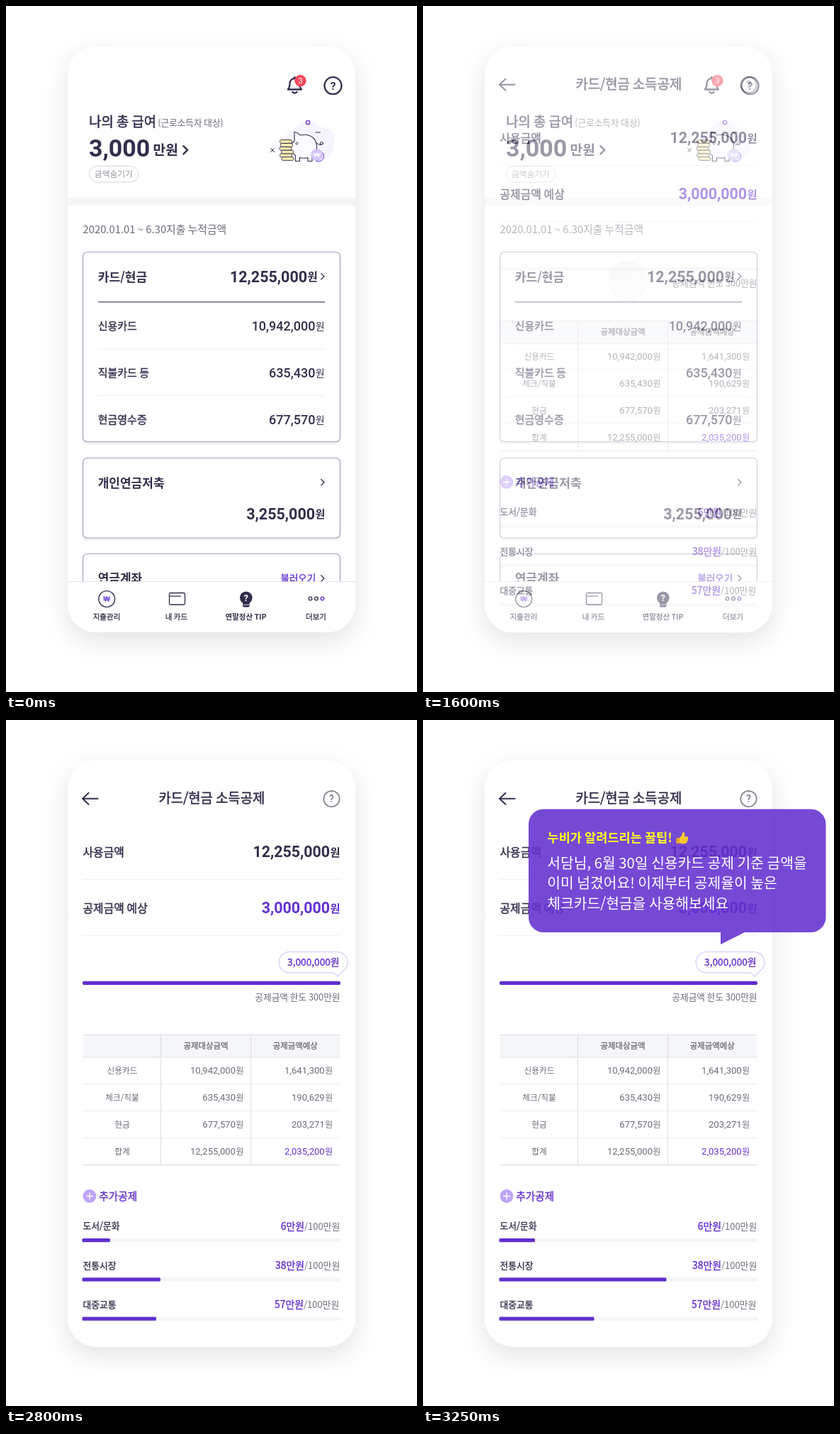
These frames come from a looping animation (580x966 px, 8700 ms). An HTML page:

```html
<!DOCTYPE html>
<html lang="ko">
<head>
<meta charset="utf-8">
<style>
html, body { margin: 0; width: 100%; height: 100%; overflow: hidden; background: #fff; }
svg { display: block; }
text { font-family: "Noto Sans CJK KR", "Noto Sans CJK", sans-serif; white-space: pre; word-spacing: -0.055em; }
.num { font-family: Roboto, "Noto Sans CJK KR", sans-serif; }
.line { fill: none; stroke-linecap: round; stroke-linejoin: round; }
</style>
</head>
<body>
<svg id="stage" width="580" height="966" viewBox="0 0 580 966"></svg>
<script>
const INK = '#332d4b', GRAY = '#6d6a78', PURPLE = '#6230cf';
const LOOP = 8700;

// y is the optical centre of the line; Hangul has no medium cut, so a hairline stroke thickens it
const text = (str, x, y, size, weight = 400, fill = INK, anchor = 'start', cls = '') => {
  const medium = weight === 500 && !cls ? `stroke="${fill}" stroke-width="${size * 0.026}"` : '';
  return `<text x="${x}" y="${y + size * 0.365}" font-size="${size}" font-weight="${weight}" fill="${fill}" text-anchor="${anchor}" class="${cls}" ${medium}>${str}</text>`;
};
const won = (num, right, y, size, wonSize, weight, wonWeight, fill = INK) =>
  text(num, right - wonSize * 0.92 - 0.4, y, size, weight, fill, 'end', 'num') +
  text('원', right, y + 0.5, wonSize, wonWeight, fill, 'end');
const line = (d, color = INK, width = 1.5, fill = 'none') =>
  `<path d="${d}" class="line" style="fill:${fill}" stroke="${color}" stroke-width="${width}"/>`;
const rect = (x, y, w, h, r, fill, extra = '') =>
  `<rect x="${x}" y="${y}" width="${w}" height="${h}" rx="${r}" fill="${fill}" ${extra}/>`;
const circle = (x, y, r, fill, stroke = 'none', width = 1.5, extra = '') =>
  `<circle cx="${x}" cy="${y}" r="${r}" fill="${fill}" stroke="${stroke}" stroke-width="${width}" ${extra}/>`;
const hr = (x1, x2, y, color = '#eeeef1', width = 1) => line(`M${x1} ${y}H${x2}`, color, width);
const chevron = (x, y, r, width) => line(`M${x} ${y - r}l${r} ${r}l${-r} ${r}`, INK, width);
const card = (y, h) => rect(108.6, y, 362.8, h, 6, '#fff', 'stroke="#a5a2bb" stroke-width="1.1" filter="url(#cardShadow)"');

const defs = `<defs>
  <filter id="phoneShadow" x="-20%" y="-20%" width="140%" height="140%"><feDropShadow dx="0" dy="12" stdDeviation="17" flood-opacity=".11"/></filter>
  <filter id="cardShadow" x="-5%" y="-10%" width="110%" height="125%"><feDropShadow dx="0" dy="2" stdDeviation="1.5" flood-color="#332d4b" flood-opacity=".14"/></filter>
  <filter id="touchShadow" x="-30%" y="-30%" width="160%" height="160%"><feDropShadow dx="0" dy="1.5" stdDeviation="1.8" flood-opacity=".12"/></filter>
  <linearGradient id="touchFill" x2=".4" y2="1"><stop stop-color="#f1f1f3"/><stop offset="1" stop-color="#fcfcfc"/></linearGradient>
</defs>`;

const coin = (x, y) => rect(x, y, 17, 4.8, 2, '#fbeeb4', `stroke="${INK}" stroke-width=".9"`);
const piggy =
  `<path d="M394 195C390 180 402 178 410 169C420 158 434 160 440 168C447 174 464 168 463 188C462 199 464 205 456 212C446 221 410 216 402 211C397 207 396 201 394 195Z" fill="#f6f4fe"/>` +
  circle(426, 164, 2.7, '#fff', PURPLE, 1.3) +
  hr(437, 443.5, 178, INK, 1.1) +
  line('M373.3 200.3l5.4 5.4m0-5.4l-5.4 5.4', INK, 1) +
  line('M407 190V177.5Q412 178 415 182Q427 179.5 434 186Q439 191 438.5 200Q437 207 432 211V218.5H426V213.5Q420 215 414.5 213.5V218.5H408.5V210.5Q404 208 403 203L400 202V194L404 193Z', INK, 1.1, '#fbfaff') +
  line('M438.5 193Q444 198 447 193.5Q447.5 190 444 192Q441 197 448 194', INK, 1) +
  circle(410.5, 193.5, 1.5, '#fff', INK, 1) +
  coin(386.5, 188.5) + coin(387.5, 193.5) + coin(386, 198.4) + coin(388.5, 203.2) +
  coin(386.5, 208) + coin(389, 212.6) +
  circle(441, 211.5, 7.6, 'none', PURPLE, 1) + circle(438.8, 209.7, 8.6, '#d3c4f7') +
  line('M434.5 207l2 5.5l2.3-5.5l2.3 5.5l2-5.5M433.5 209.3h10.6', '#fff', 1.1);

const tab = (label, x, weight = 500) => text(label, x, 860, 10.5, weight, INK, 'middle');
const tabBar =
  `<path d="M87 810.5H493V842a40 40 0 0 1-40 40H127a40 40 0 0 1-40-40Z" fill="#fff"/>` +
  hr(87.5, 492.5, 810.5, '#e2e2e6') +
  circle(142.2, 835, 11.4, '#fff', INK, 1.4) +
  line('M138.3 831l2 7.5l1.9-7.5l1.9 7.5l2-7.5M137.3 833.7h9.8M137.3 836.1h9.8', PURPLE, 1) +
  rect(230.5, 826.5, 22, 16.5, 1.8, '#fff', `stroke="${INK}" stroke-width="1.3"`) + hr(231, 246.5, 831.2, INK, 1.2) +
  circle(338.8, 833.2, 8.8, INK) + rect(334, 838, 9.6, 8.5, 2.6, INK) + hr(334.5, 343, 843.2, '#fff', 0.8) +
  text('?', 338.8, 833, 13, 700, '#fff', 'middle', 'num') +
  circle(429.5, 834.5, 2.3, '#fff', INK, 1.3) + circle(438, 834.5, 2.3, '#fff', INK, 1.3) + circle(446.5, 834.5, 2.3, '#fff', PURPLE, 1.3) +
  tab('지출관리', 142) + tab('내 카드', 240.5) + tab('연말정산 TIP', 338.5, 700) + tab('더보기', 437.5);

const spendRows = [['신용카드', '10,942,000', 450.5], ['직불카드 등', '635,430', 516.5], ['현금영수증', '677,570', 582.5]];
const home =
  rect(87, 57, 406, 825, 40, '#fff', 'filter="url(#phoneShadow)"') +
  line('M397.8 117.5H417C414.3 115 414.6 112 414.3 109C414 104.5 411 102 407.4 102C403.8 102 400.8 104.5 400.5 109C400.2 112 400.5 115 397.8 117.5ZM404.3 121Q407.4 124.5 410.5 121M407.4 101.5V100', INK, 2.3) +
  circle(415.5, 105.2, 8.2, '#f2495c') + text('3', 415.5, 105.2, 11.5, 400, '#fff', 'middle', 'num') +
  circle(461.5, 112.2, 12, '#fff', INK, 2.3) + text('?', 461.5, 112.2, 15.5, 700, INK, 'middle', 'num') +
  text('나의 총 급여', 117.3, 163, 18.8, 500) + text('(근로소득자 대상)', 214.3, 164.5, 12.6, 400, GRAY) +
  text('3,000', 117, 199.7, 34, 700, INK, 'start', 'num') + text('만원', 207.5, 203, 19.2, 700) + chevron(250.5, 202.8, 5.6, 2.4) +
  rect(117.5, 225.5, 69.5, 22.5, 11.25, '#fff', 'stroke="#d4d4da"') + text('금액숨기기', 152, 236.5, 11.7, 400, '#94929e', 'middle') +
  piggy +
  rect(87, 270, 406, 11, 0, '#f4f5f6') +
  text('2020.01.01 ~ 6.30지출 누적금액', 108.5, 314.5, 14.8, 400, GRAY) +
  card(346.5, 267) + text('카드/현금', 129.7, 381.5, 17.1, 700) +
  won('12,255,000', 439.8, 381, 21.5, 15.5, 700, 700) + chevron(444.7, 380.7, 4.3, 1.3) +
  hr(130.5, 449.5, 416.8, '#6a6685', 1.4) + hr(130.5, 449.5, 483) + hr(130.5, 449.5, 548.5) +
  spendRows.map(([label, sum, y]) => text(label, 129.7, y, 15, 500) + won(sum, 449.7, y, 18, 14, 500, 400)).join('') +
  card(636.5, 112.5) + text('개인연금저축', 129.7, 671.5, 17, 700) + chevron(444.7, 670.8, 4.3, 1.3) +
  won('3,255,000', 450.3, 715.5, 21.5, 15, 700, 700) +
  card(771.5, 70) + text('연금계좌', 129.7, 806, 17, 700) + text('불러오기', 387.5, 806, 13.5, 500, PURPLE) + chevron(444.7, 806, 4.3, 1.3) +
  tabBar;

const tableRows = [['신용카드', '10,942,000', '1,641,300'], ['체크/직불', '635,430', '190,629'], ['현금', '677,570', '203,271'], ['합계', '12,255,000', '2,035,200']];
const table =
  rect(108.5, 443.5, 363, 31.5, 0, '#f5f6f9') +
  hr(109, 471, 443.5, '#dddde2') + hr(109, 471, 475, '#dddde2') +
  [512.5, 550.5, 588.5].map(y => hr(109, 471, y)).join('') + hr(109, 471, 626.5, '#d8d8de', 1.2) +
  line('M218.5 444V626M345.5 444V626', '#dddde2', 1) +
  text('공제대상금액', 282, 459, 11.4, 500, GRAY, 'middle') + text('공제금액예상', 408.3, 459, 11.4, 500, GRAY, 'middle') +
  tableRows.map(([label, base, cut], i) => {
    const y = 493.5 + i * 38;
    return text(label, 164, y, 11.7, 400, GRAY, 'middle') + won(base, 335.3, y, 13.1, 11.8, 400, 400, GRAY) +
      won(cut, 461, y, 13.1, 11.8, 400, 400, i === 3 ? PURPLE : GRAY);
  }).join('');

// label, amount, right edge, text centre, bar width, end time
const extras = [['도서/문화', '6만원', 471.3, 712.8, 50.5, 2900], ['전통시장', '38만원', 471.3, 768, 236, 3200], ['대중교통', '57만원', 470.3, 823.2, 134, 2900]];
const detail =
  rect(88, 57, 404.5, 826, 40, '#fff') +
  line('M108 110.8H129.5M116.5 102.8L108 110.8L116.5 118.8', INK, 2) +
  text('카드/현금 소득공제', 290.3, 110.5, 18.8, 500, INK, 'middle') +
  circle(459.5, 111, 11.2, '#fff', '#86838f', 1.7) + text('?', 459.5, 111, 14, 500, '#77748a', 'middle', 'num') +
  text('사용금액', 108.5, 186, 15.9, 500) + won('12,255,000', 471.6, 185.6, 21.4, 15.3, 700, 700) + hr(109, 471, 224.8) +
  text('공제금액 예상', 108.5, 265, 15.9, 500) + won('3,000,000', 471.6, 264.6, 21.4, 15.3, 700, 700, PURPLE) + hr(107, 470, 303.8) +
  rect(108, 367.7, 364, 5.3, 1.5, '#f4f5f8') + rect(108, 367.7, 0, 5.3, 1.5, PURPLE, 'id="mainBar"') +
  text('공제금액 한도 300만원', 471.5, 390.5, 12.7, 400, GRAY, 'end') +
  table +
  circle(118, 670.5, 9.4, '#bda4f8') + line('M113.5 670.5h9M118 666v9', '#fff', 1.3) + text('추가공제', 131.3, 671, 14.7, 500, PURPLE) +
  extras.map(([label, sum, right, y], i) =>
    text(label, 108.5, y, 12.8, 500) +
    text('/100만원', right, y, 12.9, 400, GRAY, 'end') + text(sum, right - 50.2, y, 13.9, 500, PURPLE, 'end') +
    rect(108, y + 17.2, 364, 5.3, 1.5, '#f5f5f7') + rect(107.5, y + 17.2, 0, 5.3, 1.5, PURPLE, `id="bar${i}"`)).join('') +
  `<g id="tooltip">` +
  line('M400 326.5H467.2A14.7 14.7 0 0 1 475 353.8L468 361L462.5 356H400A14.7 14.7 0 0 1 400 326.5Z', '#dbd2f6', 1.4, '#fff') +
  text('3,000,000원', 470.5, 340.7, 13.7, 500, PURPLE, 'end') + `</g>`;

const thumb =
  rect(357.5, 166, 4.6, 8, 1, '#e8a81c') +
  '<path d="M362 165.5Q366 163 366 158.5Q369.5 157 369.5 161L368.8 164H372.5Q375 165 373.8 167.3Q375 169 373 170.2Q373.7 172 371.8 172.6Q371.5 174.5 369 174.3H364.5L362 173Z" fill="#fcc935"/>' +
  line('M368.5 167.2h4.5M368.5 169.9h4M368.5 172.3h3', '#e8a81c', 0.6);
const popup =
  '<path d="M170 125.5H547.5a21 21 0 0 1 21 21V278a21 21 0 0 1-21 21H454L420 316V299H170a21 21 0 0 1-21-21V146.5a21 21 0 0 1 21-21Z" fill="#6430d0" fill-opacity=".88"/>' +
  text('누비가 알려드리는 꿀팁!', 175.5, 166, 17.6, 700, '#ffff1f') + thumb +
  ['서담님, 6월 30일 신용카드 공제 기준 금액을', '이미 넘겼어요! 이제부터 공제율이 높은', '체크카드/현금을 사용해보세요']
    .map((str, i) => text(str, 175.3, 201.5 + i * 28.4, 20.35, 400, '#fff')).join('');

const $ = id => document.getElementById(id);
$('stage').innerHTML = defs + home +
  `<g id="touch">${circle(0, 0, 26, 'url(#touchFill)', 'none', 0, 'filter="url(#touchShadow)"')}</g>` +
  `<g id="detail">${detail}</g><g id="popup">${popup}</g>`;

const ramp = (t, from, to) => Math.min(1, Math.max(0, (t - from) / (to - from)));
const set = (id, name, value) => $(id).setAttribute(name, value);

function render() {
  const t = performance.now() % LOOP;

  const move = ramp(t, 680, 1170), eased = move * move * (3 - 2 * move);
  set('touch', 'transform', `translate(${465 - 176 * eased} ${500 - 115 * eased})`);
  set('touch', 'opacity', t < 1650 ? ramp(t, 660, 900) * 0.9 : 0);

  set('detail', 'opacity', ramp(t, 1550, 1650));
  set('mainBar', 'width', 364 * ramp(t, 2000, 2800));
  set('mainBar', 'rx', t < 2800 ? 1.5 : 2.6);
  set('tooltip', 'opacity', ramp(t, 2700, 2800));
  extras.forEach(([, , , , width, end], i) => set('bar' + i, 'width', width * ramp(t, 2450, end)));

  const grow = ramp(t, 3000, 3250), scale = 0.225 + 0.775 * grow;
  set('popup', 'opacity', grow);
  set('popup', 'transform', `translate(420 316) scale(${scale}) translate(-420 -316)`);
  requestAnimationFrame(render);
}
render();
</script>
</body>
</html>
```
